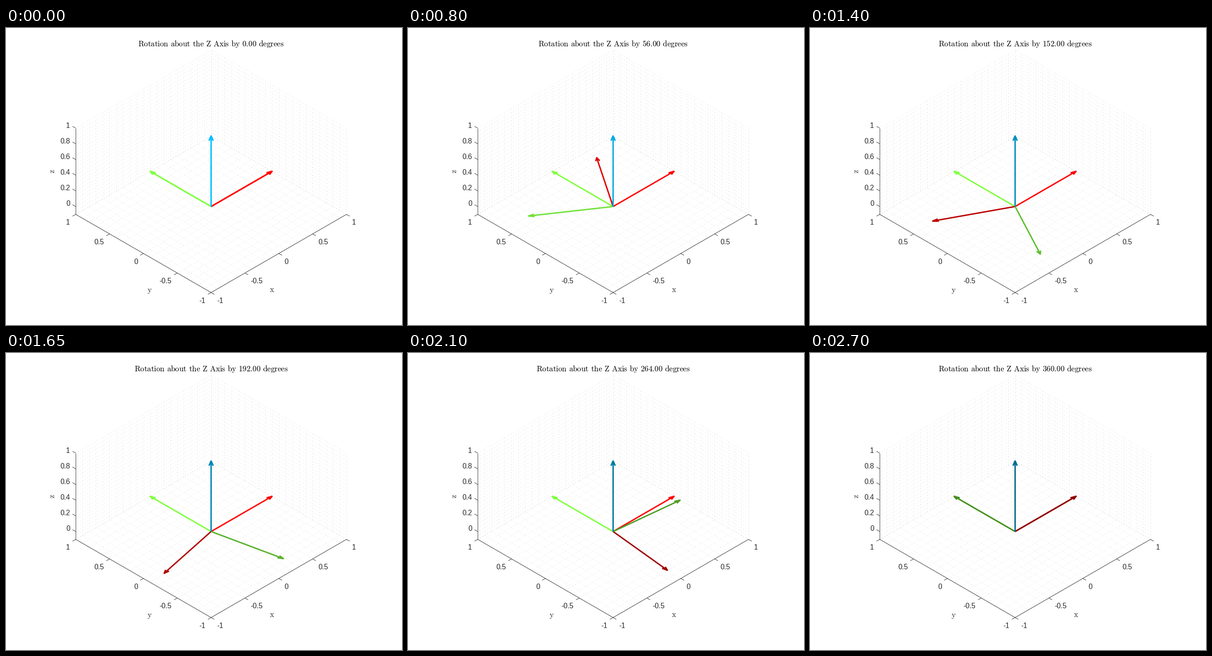
Write a matplotlib script that moves like this. It is 864 px wide and 648 px high and loops after 2750 ms.

```python
import numpy as np
import matplotlib.pyplot as plt
from matplotlib.animation import FuncAnimation
from matplotlib.collections import LineCollection

# 72 dpi makes one point equal one pixel
W, H, DPI = 864, 648, 72
TICKS, INTERVAL, HOLD, STEP = 55, 50, 9, 8
INK = "#262626"
FLOOR = -0.1
LENGTH = 0.9
RED, GREEN, BLUE = (1, 0, 0), (0.5, 1, 0.25), (0, 0.75, 1)

plt.rcParams["mathtext.fontset"] = "cm"
plt.rcParams["font.family"] = "Liberation Sans"

fig = plt.figure(figsize=(W / DPI, H / DPI), dpi=DPI, facecolor="white")
ax = fig.add_axes([0, 0, 1, 1])
ax.set_xlim(0, W)
ax.set_ylim(H, 0)
ax.axis("off")


def project(p):
    """Isometric view of a 3D point, in stage pixels."""
    x, y, z = p
    return np.array([447.5 + 147.7 * (x - y), 389.5 - 85.3 * (x + y) - 171 * z])


def segment(a, b):
    return [project(a), project(b)]


def roman(text):
    return r"$\mathrm{" + text.replace(" ", r"\hspace{0.38}") + "}$"


def draw_grid():
    lines = []
    for v in np.linspace(-1, 1, 21):
        lines.append(segment((v, -1, FLOOR), (v, 1, FLOOR)))
        lines.append(segment((-1, v, FLOOR), (1, v, FLOOR)))
        lines.append(segment((v, 1, FLOOR), (v, 1, 1)))
        lines.append(segment((1, v, FLOOR), (1, v, 1)))
    for z in np.linspace(FLOOR, 1, 23):
        lines.append(segment((-1, 1, z), (1, 1, z)))
        lines.append(segment((1, -1, z), (1, 1, z)))
    ax.add_collection(LineCollection(lines, colors=[(0.1, 0.1, 0.1, 0.25)],
                                     linewidths=0.8, zorder=1,
                                     linestyles=[(0, (1.25, 6.25))]))


def draw_axes():
    lines = [segment((-1, 1, FLOOR), (-1, 1, 1)),
             segment((-1, 1, FLOOR), (-1, -1, FLOOR)),
             segment((-1, -1, FLOOR), (1, -1, FLOOR))]

    def tick(p, mark, shift, label, align):
        at = project(p)
        lines.append([at, at + mark])
        x, y = at + shift
        ax.text(x, y, label, size=15.5, ha=align, va="baseline", color=INK)

    for v in np.linspace(-1, 1, 5):
        tick((v, -1, FLOOR), (7, 4), (12.3, 22.7), f"{v:g}", "left")
        tick((-1, v, FLOOR), (-7, 4), (-12.3, 22.7), f"{v:g}", "right")
    for z in np.linspace(0, 1, 6):
        tick((-1, 1, z), (-7, -4), (-12.3, -1), f"{z:g}", "right")
    ax.add_collection(LineCollection(lines, colors=INK, linewidths=0.9, zorder=2))

    for name, x, y, turn in (("x", 580.5, 576.5, 0), ("y", 313.5, 576.5, 0)):
        ax.text(x, y, roman(name), size=17, ha="center", va="baseline", color=INK)
    ax.text(101, 312.5, roman("z"), size=17, rotation=90,
            ha="center", va="center", color=INK)


def arrow_path(direction, side):
    tip = LENGTH * np.array(direction, float)
    back = 0.06 * np.array(direction, float)
    wing = 0.0215 * np.array(side, float)
    gap = [np.nan, np.nan]
    pts = [project((0, 0, 0)), project(tip), gap,
           project(tip - back + wing), project(tip), project(tip - back - wing)]
    return np.array(pts).T


def add_arrow(color, zorder):
    return ax.plot([], [], color=color, lw=3, zorder=zorder,
                   solid_capstyle="butt", solid_joinstyle="round")[0]


def frame_arrows(angle):
    c, s = np.cos(angle), np.sin(angle)
    u, v = (c, s, 0), (-s, c, 0)
    diagonal = (0.707, -0.707, 0)
    return arrow_path(u, v), arrow_path(v, u), arrow_path((0, 0, 1), diagonal)


draw_grid()
draw_axes()
colors = (RED, GREEN, BLUE)
for path, color in zip(frame_arrows(0), colors):
    add_arrow(color, 3).set_data(*path)
moving = [add_arrow(color, 4) for color in colors]
title = ax.text(447.5, 40, "", size=17, ha="center", va="baseline", color="black")


def update(tick):
    n = max(0, tick - HOLD)
    degrees = n * STEP
    shade = 1 / (1 + n / 55)
    for line, path, color in zip(moving, frame_arrows(np.radians(degrees)), colors):
        line.set_data(*path)
        line.set_color(tuple(shade * c for c in color))
    title.set_text(roman(f"Rotation about the Z Axis by {degrees:.2f} degrees"))
    return moving + [title]


anim = FuncAnimation(fig, update, frames=TICKS, interval=INTERVAL,
                     repeat=True, repeat_delay=0)
plt.show()
```
